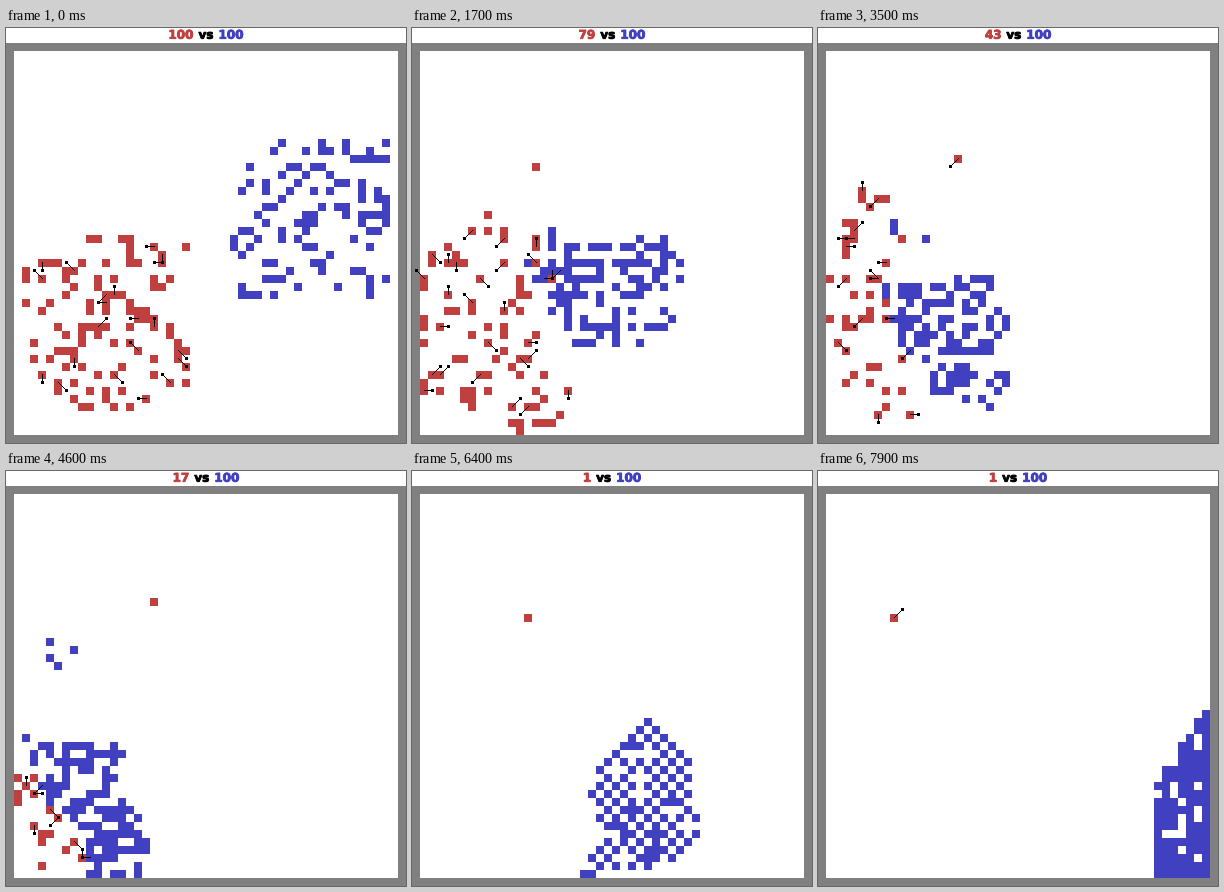
These frames come from a looping animation (400x415 px, 8 s). A matplotlib script:

```python
import numpy as np
import matplotlib.pyplot as plt
from matplotlib.animation import FuncAnimation
from matplotlib.path import Path
from matplotlib.patheffects import withStroke

W, H, N, CELL, FRAMES = 400, 415, 48, 8, 80
X0, Y0 = 8, 23
RED, BLUE = (192, 64, 64), (64, 64, 192)
rng = np.random.default_rng(5)
ROW, COL = np.mgrid[0:N, 0:N].reshape(2, -1)
CELLS = np.column_stack([COL, ROW]).astype(float)


def crowd(n, *corners, prefer=None):
    """Choose n random cells inside a polygon, preferred cells first."""
    shape = Path(corners, closed=False)
    inside = (shape.contains_points(CELLS, radius=0.6)
              | shape.contains_points(CELLS, radius=-0.6))
    rank = rng.random(len(CELLS))
    if prefer is not None:
        rank[~prefer] += 0.8
    far = np.hypot(*(CELLS - np.mean(corners, axis=0)).T)
    rank = np.where(inside, rank, 9 + far)
    return CELLS[np.argsort(rank)[:n]]


def match(src, dst):
    """Reorder src so that its first items lie close to the items of dst."""
    cost = ((src[:, None] - dst[None]) ** 2).sum(2)
    m, order = len(dst), list(range(len(src)))
    for _ in range(5):
        for i in range(m):
            for j in range(i + 1, len(src)):
                p, q = order[i], order[j]
                old, new = cost[p, i], cost[q, i]
                if j < m:
                    old, new = old + cost[q, j], new + cost[p, j]
                if new < old:
                    order[i], order[j] = q, p
    src = src[order]
    rest = src[m:]
    return np.vstack([src[:m], rest[np.argsort(rest[:, 0])]])


def settle(points):
    """Snap to the grid with one unit per cell."""
    taken, out = set(), []
    near = sorted(((x, y) for x in range(-4, 5) for y in range(-4, 5)),
                  key=lambda d: d[0] ** 2 + d[1] ** 2)
    for c, r in np.clip(np.rint(points), 0, N - 1).astype(int):
        for dx, dy in near:
            cell = (c + dx, r + dy)
            if cell not in taken and 0 <= min(cell) and max(cell) < N:
                break
        taken.add(cell)
        out.append(cell)
    return np.array(out)


def slide(points, step):
    """Run right at three cells per step and pile up at the wall."""
    q = points + [3 * step, 0]
    wall = np.full(N, N - 1)
    for i in np.argsort(-q[:, 0]):
        r = int(q[i, 1])
        q[i, 0] = min(q[i, 0], wall[r])
        wall[r] = q[i, 0] - 1
    return q


TURN, RUN, STOP, END = 57, 58, 69, FRAMES - 1

# Blue swarm: scattered, closing in, raiding the corner, then running right
blue_keys = [0, 9, 25, 46, TURN]
scatter = crowd(100, (30, 11), (46, 11), (46, 28), (44, 30), (28, 30), (26, 23))
wedge = crowd(100, (18, 22), (21, 20), (34, 22), (36, 27), (32, 29), (24, 34),
              (22, 34), (18, 28))
claw = crowd(100, (11, 22), (13, 27), (22, 27), (24, 25), (28, 25), (30, 27),
             (24, 33), (15, 33), (16, 36), (23, 36), (28, 38), (25, 41),
             (16, 38), (11, 28))
raid = np.vstack([
    crowd(96, (0, 29), (4, 31), (14, 31), (11, 37), (15, 39), (16, 44),
          (15, 47), (9, 47), (8, 42), (4, 39), (2, 33)),
    [(4, 18), (7, 19), (4, 20), (5, 21)]])
flock = crowd(100, (10, 28), (15, 33), (16, 42), (14, 45), (8, 47), (2, 47),
              (5, 42), (3, 37), (4, 34), (7, 30), prefer=(COL + ROW) % 2 == 0)
pile = crowd(100, (47, 27), (47, 47), (41, 47), (41, 36),
             prefer=(COL == N - 1) | (ROW > 45))
blue = [scatter, wedge, claw, raid, settle(flock - [3, 0]).astype(float)]
for k in range(len(blue) - 2, -1, -1):
    blue[k] = match(blue[k], blue[k + 1])
against = slide(flock, STOP - RUN)
pile = match(pile, against)

# Red walkers: the first one wanders off and outlives the rest
red_keys = [0, 9, 25, 46, RUN, STOP, END]
loner = np.array([(14, 23), (13, 17), (13, 11), (17, 13), (15, 13), (12, 16),
                  (8, 15)], float)
crowds = [
    crowd(99, (6, 23), (21, 23), (21, 41), (14, 44), (8, 44), (1, 39), (1, 26)),
    crowd(91, (0, 25), (10, 20), (18, 27), (22, 40), (18, 45), (12, 47),
          (0, 42)),
    crowd(65, (0, 18), (9, 18), (13, 26), (13, 36), (18, 43), (17, 47), (7, 47),
          (0, 40)),
    crowd(16, (0, 31), (3, 38), (9, 45), (6, 46), (3, 46), (0, 39))]
for k in (2, 1, 0):
    crowds[k] = match(crowds[k], crowds[k + 1])
red = [np.vstack([p, c]) for p, c in zip(loner, crowds)]
red += [p[None] for p in loner[len(crowds):]]

wander = rng.integers(-1, 2, (FRAMES, 100, 2))
drift = rng.normal(0, 2.5, (100, 2))
ways = np.array([(x, y) for x in (-1, 0, 1) for y in (-1, 0, 1) if x or y])
aim = ways[rng.integers(0, 8, (FRAMES, 100))]
aiming = rng.random((FRAMES, 100)) < 0.29


def segment(keys, f):
    k = min(np.searchsorted(keys, f, side="right") - 1, len(keys) - 2)
    return k, (f - keys[k]) / (keys[k + 1] - keys[k])


def blue_at(f):
    if f <= TURN:
        k, u = segment(blue_keys, f)
        return settle(blue[k] + (blue[k + 1] - blue[k]) * u)
    if f <= STOP:
        return settle(slide(flock, f - RUN))
    u = (f - STOP) / (END - STOP)
    return settle(against + (pile - against) * (1 - (1 - u) ** 3))


def red_at(f):
    n = round(float(np.interp(f, [0, 9, 25, 46, 54, 56],
                              [100, 92, 66, 17, 2, 1])))
    k, u = segment(red_keys, f)
    a, b = red[k], red[k + 1]
    b = np.vstack([b, a[len(b):] + drift[len(b):len(a)]])
    p = (a + (b - a) * u)[:n]
    if f not in red_keys and f < RUN:
        p = p + wander[f, :n]
    return settle(p)


def moves(f, reds, blues):
    """Arrows as (cell, direction): red steps and blue attacks."""
    steps = [(p, aim[f, i]) for i, p in enumerate(reds) if aiming[f, i]]
    swarm = {tuple(b) for b in blues}
    dice = np.random.default_rng(f)
    fights = 0
    for p in reds:
        foes = [w for w in ways if tuple(p + w) in swarm]
        if foes and fights < 6:
            fights += 1
            steps += [(p + w, -w) for w in foes if dice.random() < 0.4]
    return steps


def paint_cells(canvas, cells, color):
    for c, r in cells:
        x, y = X0 + CELL * c, Y0 + CELL * r
        canvas[y:y + CELL, x:x + CELL] = color


def paint_arrow(canvas, cell, way):
    x, y = cell * CELL + [X0 + 4, Y0 + 3]
    dx, dy = way
    for s in range(CELL + 1):
        canvas[y + s * dy, x + s * dx] = 0
    x, y = x + CELL * dx, y + CELL * dy
    canvas[y - 1:y + 2, x - 1:x + 2] = 0


blank = np.full((H, W, 3), 255, np.uint8)
blank[15:] = 128
blank[Y0:Y0 + N * CELL, X0:X0 + N * CELL] = 255

fig = plt.figure(figsize=(W / 100, H / 100), dpi=100, facecolor="white")
screen = fig.figimage(blank, origin="upper", zorder=-1)


def label(text, color, ha):
    color = np.array(color) / 255
    return fig.text(0.5, 1 - 10.7 / H, text, color=color, ha=ha, va="baseline",
                    family="DejaVu Sans", weight="bold", size=12 * 0.72,
                    path_effects=[withStroke(linewidth=0.6, foreground=color)])


red_label = label("100", RED, "right")
vs_label = label("vs", (0, 0, 0), "center")
blue_label = label("100", BLUE, "left")


def draw(f):
    blues, reds = blue_at(f), red_at(f)
    canvas = blank.copy()
    paint_cells(canvas, blues, BLUE)
    paint_cells(canvas, reds, RED)
    for cell, way in moves(f, reds, blues):
        paint_arrow(canvas, cell, way)
    screen.set_data(canvas)

    count = str(len(reds))
    mid = 200 + (len(count) - 3) * 4.17
    red_label.set_text(count)
    red_label.set_x((mid - 12.5) / W)
    vs_label.set_x(mid / W)
    blue_label.set_x((mid + 12.5) / W)
    return screen, red_label, vs_label, blue_label


anim = FuncAnimation(fig, draw, frames=FRAMES, interval=100, repeat=True,
                     repeat_delay=0, blit=False)
plt.show()
```
